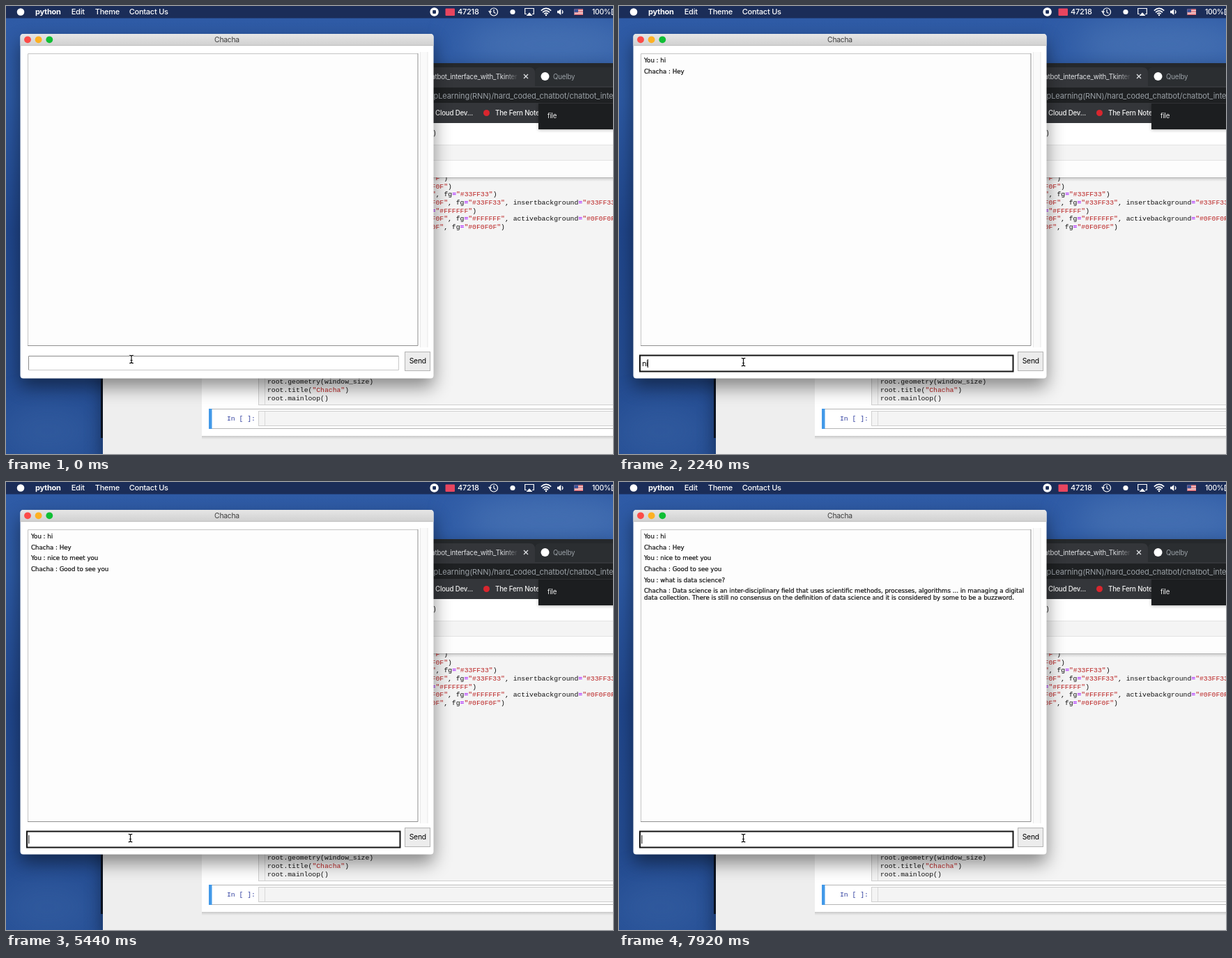
Animation of 871 by 643 pixels, one loop 8 s. Source, as an HTML page:

```html
<!DOCTYPE html>
<html lang="en">
<head>
<meta charset="utf-8">
<title>Chacha</title>
<style>
  html, body { margin: 0; width: 100%; height: 100%; overflow: hidden; background: #24509a; }
  svg { display: block; width: 100vw; height: 100vh; }
  text { white-space: pre; }
  .ui { font: 10.3px Inter, sans-serif; letter-spacing: -.22px; }
  .menu { font: 500 11px Inter, sans-serif; letter-spacing: -.24px; fill: #fff; }
  .tab { font: 9.7px Inter, sans-serif; letter-spacing: -.18px; }
  .url { font: 11px Inter, sans-serif; letter-spacing: -.08px; }
  .code { font: 9.76px "Liberation Mono", monospace; fill: #111; }
  .code .s { fill: #ba2121; }
  .code .o { fill: #a2f; font-weight: 700; }
  .chat { font: 8.64px "DejaVu Sans", sans-serif; fill: #111; stroke: #111; stroke-width: .22px; }
  .shadow { filter: drop-shadow(0 12px 13px rgba(0, 0, 0, .45)); }
  .tip { filter: drop-shadow(0 1px 2px rgba(0, 0, 0, .3)); }
  .cloud { filter: blur(24px); }
</style>
</head>
<body>
<svg viewBox="0 0 871 643" preserveAspectRatio="none">
  <defs>
    <linearGradient id="sky" x2="0" y2="1">
      <stop offset="0" stop-color="#2f5ba6"/>
      <stop offset=".2" stop-color="#2d5aa4"/>
      <stop offset=".5" stop-color="#20468b"/>
      <stop offset="1" stop-color="#264f95"/>
    </linearGradient>
    <linearGradient id="bar" x2="0" y2="1">
      <stop offset="0" stop-color="#e6e6e6"/>
      <stop offset="1" stop-color="#d0d0d0"/>
    </linearGradient>
    <linearGradient id="fade" x2="0" y2="1">
      <stop offset="0" stop-color="#000" stop-opacity=".16"/>
      <stop offset="1" stop-color="#000" stop-opacity="0"/>
    </linearGradient>
    <linearGradient id="tabInk" gradientUnits="userSpaceOnUse" x1="716" x2="735">
      <stop offset="0" stop-color="#dfe1e4"/>
      <stop offset="1" stop-color="#dfe1e4" stop-opacity="0"/>
    </linearGradient>
    <clipPath id="markClip"><path d="M600 140H764V168H600Z"/></clipPath>
    <clipPath id="cellClip"><path d="M600 246H871V540H600Z"/></clipPath>
  </defs>

  <!-- desktop -->
  <rect width="871" height="643" fill="url(#sky)"/>
  <g class="cloud" fill="#5c86c0">
    <ellipse cx="780" cy="55" rx="130" ry="36" opacity=".5"/>
    <ellipse cx="60" cy="610" rx="70" ry="40" opacity=".2"/>
  </g>

  <!-- browser -->
  <g class="shadow">
    <path d="M139 643V90Q139 82 147 82H871V643Z" fill="#25282b"/>
  </g>
  <path d="M136 535H139V620H136Z" fill="#0b1220"/>
  <path d="M139 115H600V88H751Q759 88 759 96V115H871V168H139Z" fill="#34363a"/>
  <path d="M759 115V96Q759 88 767 88H871V115Z" fill="#2b2e31"/>
  <rect x="300" y="117" width="580" height="22" fill="#1f2123"/>
  <text class="tab" x="610.2" y="104.5" fill="url(#tabInk)">atbot_interface_with_Tkinter</text>
  <path d="M743 98l6 6m0-6l-6 6" stroke="#dfe1e4" stroke-width="1.3"/>
  <circle cx="773.5" cy="101" r="6" fill="#fff"/>
  <text class="tab" x="785" y="104.5" fill="#9aa0a6">Quelby</text>
  <text class="url" x="613.5" y="132.5" fill="#9aa0a6">pLearning(RNN)/hard_coded_chatbot/chatbot_interface</text>
  <g class="tab" fill="#f1f1f1" style="font-weight:500" clip-path="url(#markClip)">
    <text x="616" y="157">Cloud Dev...</text>
    <circle cx="689.5" cy="153.5" r="4.5" fill="#d9262e"/>
    <text x="702" y="157">The Fern Notes</text>
  </g>

  <!-- notebook -->
  <rect x="139" y="168" width="732" height="475" fill="#eee"/>
  <rect x="281" y="168" width="590" height="449" fill="#fff"/>
  <rect x="281" y="617" width="590" height="5" fill="url(#fade)"/>
  <rect x="139" y="168" width="732" height="31" fill="#fff"/>
  <rect x="139" y="199" width="732" height="22" fill="#f4f4f4"/>
  <path d="M139 199.5H871M139 221.5H871" stroke="#e4e4e4"/>
  <rect x="139" y="222" width="732" height="24" fill="#fdfdfd"/>
  <text class="ui" x="613.5" y="186" fill="#222">)</text>
  <rect x="362.5" y="246.5" width="520" height="326" fill="#f4f4f4" stroke="#cfcfcf"/>
  <path d="M371.5 246V572" stroke="#d8d8d8"/>
  <rect x="281" y="246" width="590" height="6" fill="url(#fade)"/>
  <g class="code" clip-path="url(#cellClip)">
    <text x="616.5" y="250"><tspan class="s">F"</tspan>)</text>
    <text x="610.6" y="261.7"><tspan class="s">F0F"</tspan>)</text>
    <text x="610.9" y="273.3"><tspan class="s">"</tspan>, fg<tspan class="o">=</tspan><tspan class="s">"#33FF33"</tspan>)</text>
    <text x="610.6" y="285"><tspan class="s">F0F"</tspan>, fg<tspan class="o">=</tspan><tspan class="s">"#33FF33"</tspan>, insertbackground<tspan class="o">=</tspan><tspan class="s">"#33FF33"</tspan></text>
    <text x="610.6" y="296.7"><tspan class="o">=</tspan><tspan class="s">"#FFFFFF"</tspan>)</text>
    <text x="610.6" y="308.4"><tspan class="s">F0F"</tspan>, fg<tspan class="o">=</tspan><tspan class="s">"#FFFFFF"</tspan>, activebackground<tspan class="o">=</tspan><tspan class="s">"#0F0F0F"</tspan></text>
    <text x="610.6" y="320"><tspan class="s">0F"</tspan>, fg<tspan class="o">=</tspan><tspan class="s">"#0F0F0F"</tspan>)</text>
  </g>
  <g class="code">
    <text x="375" y="542">root.geometry(window_size)</text>
    <text x="375" y="553.8">root.title(<tspan class="s">"Chacha"</tspan>)</text>
    <text x="375" y="565.6">root.mainloop()</text>
  </g>
  <path d="M291 578.5H871M291 606.5H871" stroke="#b5b5b5"/>
  <rect x="291" y="578" width="4.5" height="29" fill="#4299e8"/>
  <rect x="362.5" y="581.5" width="520" height="21" fill="#f4f4f4" stroke="#cfcfcf"/>
  <path d="M371.5 582V602" stroke="#d8d8d8"/>
  <text class="code" x="317" y="595" style="fill:#303f9f">In [ ]:</text>

  <!-- tooltip -->
  <rect class="tip" x="764" y="140" width="120" height="37" fill="#1c1e20"/>
  <text class="tab" x="777" y="161" fill="#f1f1f1">file</text>

  <!-- menu bar -->
  <rect width="871" height="17.5" fill="#1b2d58"/>
  <circle cx="21" cy="8.5" r="5.3" fill="#fff"/>
  <g class="menu">
    <text x="42" y="12.2" style="font-weight:700">python</text>
    <text x="93.7" y="12.2">Edit</text>
    <text x="127.7" y="12.2">Theme</text>
    <text x="176.7" y="12.2">Contact Us</text>
    <text x="648" y="12.2">47218</text>
    <text x="841" y="12.2" style="font-size:10.3px">100%</text>
  </g>
  <circle cx="614.6" cy="8.5" r="6.2" fill="#fff"/>
  <rect x="612.2" y="6.1" width="4.8" height="4.8" rx=".8" fill="#1b2d58"/>
  <rect x="630.5" y="3.5" width="13.5" height="10.5" rx="1" fill="#e8455f"/>
  <g fill="none" stroke="#fff" stroke-width="1.2">
    <circle cx="700" cy="8.5" r="5.5"/>
    <path d="M700 5V9L702.5 10.5M692.5 7l2 2.5 2-2"/>
    <path d="M747 11.5H744.7V3.5H757.3V11.5H755"/>
    <path d="M767.8 6.6Q775 .2 782.2 6.6M770 9.1Q775 4.8 780 9.1M772.3 11.3Q775 9 777.7 11.3" stroke-width="1.6"/>
    <path d="M798 6Q800 8.5 798 11"/>
    <path d="M872 4.5H869.5V12.5H872"/>
  </g>
  <g fill="#fff">
    <circle cx="727" cy="8.5" r="3.6"/>
    <path d="M746.5 14L751 9.3L755.5 14Z"/>
    <circle cx="775" cy="13" r="1.2"/>
    <path d="M791 6.7H793L796.3 4V13L793 10.3H791Z"/>
    <rect x="815.5" y="4.5" width="12.5" height="8.5"/>
  </g>
  <path d="M815.5 5.2H828M815.5 7.6H828M815.5 10H828M815.5 12.4H828" stroke="#d0404a" stroke-width="1.2"/>
  <rect x="815.5" y="4.5" width="5.5" height="4.5" fill="#3c5499"/>

  <!-- chat window -->
  <g class="shadow">
    <path d="M20.5 530V44.5Q20.5 40 25 40H609Q613.5 40 613.5 44.5V530Q613.5 534.5 609 534.5H25Q20.5 534.5 20.5 530Z" fill="#fff"/>
  </g>
  <path d="M20.5 57V44.5Q20.5 40 25 40H609Q613.5 40 613.5 44.5V57Z" fill="url(#bar)"/>
  <path d="M20.5 56.7H613.5" stroke="#b9b9b9" stroke-width=".8"/>
  <circle cx="31" cy="48.3" r="4.9" fill="#fc4b48"/>
  <circle cx="46.6" cy="48.3" r="4.9" fill="#fdb124"/>
  <circle cx="62.3" cy="48.3" r="4.9" fill="#10bf35"/>
  <text class="ui" x="317" y="52.2" text-anchor="middle" fill="#3d3d3d">Chacha</text>
  <rect x="31.5" y="68.5" width="559.5" height="419" fill="#fdfdfd"/>
  <path d="M31.5 487.5V68.5H591" fill="none" stroke="#c4c4c4"/>
  <path d="M31 487.5H591V68" fill="none" stroke="#8f8f8f"/>
  <rect x="594" y="66" width="11" height="424" fill="#fafafa"/>
  <path d="M594.5 66V490M605 66V490" stroke="#e9e9e9"/>
  <rect x="572.5" y="496.5" width="36" height="27" fill="#ececec" stroke="#b4b4b4"/>
  <text class="ui" x="590.8" y="513.3" text-anchor="middle" fill="#000">Send</text>

  <g class="chat" id="log"></g>

  <g id="idle" fill="none">
    <path d="M32.5 523V502.5H564" stroke="#8c8c8c"/>
    <path d="M32 522.5H563.5V502" stroke="#c9c9c9"/>
  </g>
  <rect id="ring" x="30" y="501.5" width="535.5" height="23" fill="#fff" stroke="#141414" stroke-width="2"/>
  <text class="ui" id="entry" x="33.2" y="516.7"></text>
  <path id="caret" d="M0 507V519" stroke="#000"/>
  <g id="beam" fill="none">
    <path d="M-2.8-5.7Q0-5.7 0-4Q0-5.7 2.8-5.7M0-4.5V4.5M-2.8 5.7Q0 5.7 0 4Q0 5.7 2.8 5.7M-1.5 1.5H1.5" stroke="#fff" stroke-width="2.6"/>
    <path d="M-2.8-5.7Q0-5.7 0-4Q0-5.7 2.8-5.7M0-4.5V4.5M-2.8 5.7Q0 5.7 0 4Q0 5.7 2.8 5.7M-1.5 1.5H1.5" stroke="#111" stroke-width="1.2"/>
  </g>
</svg>
<script>
const LOOP = 8000, STEP = 80, FOCUS = 440;
const SVG = 'http://www.w3.org/2000/svg';
const $ = id => document.getElementById(id);
const [log, idle, ring, entry, caret, beam] =
  ['log', 'idle', 'ring', 'entry', 'caret', 'beam'].map($);

const turns = [
  { say: 'hi', from: 1040, pace: 160, send: 1760, reply: ['Hey'] },
  { say: 'nice to meet you', from: 2080, pace: 100, send: 3840, reply: ['Good to see you'] },
  { say: 'what is data science?', from: 5520, pace: 75, send: 7520, reply: [
    'Data science is an inter-disciplinary field that uses scientific methods, processes, algorithms ... in managing a digital',
    'data collection. There is still no consensus on the definition of data science and it is considered by some to be a buzzword.'
  ] }
];

function addLine(parent, y, str) {
  const el = document.createElementNS(SVG, 'text');
  el.setAttribute('x', 36);
  el.setAttribute('y', y);
  el.textContent = str;
  parent.append(el);
}

turns.forEach((turn, i) => {
  const y = 81 + i * 31.3;
  turn.group = document.createElementNS(SVG, 'g');
  log.append(turn.group);
  addLine(turn.group, y, 'You : ' + turn.say);
  turn.reply.forEach((str, k) =>
    addLine(turn.group, y + 15.7 + k * 9.3, (k ? '' : 'Chacha : ') + str));
});

const show = (el, on) => el.setAttribute('visibility', on ? 'visible' : 'hidden');

function draw(t) {
  let typed = '';
  for (const turn of turns) {
    show(turn.group, t >= turn.send);
    if (t >= turn.from && t < turn.send)
      typed = turn.say.slice(0, Math.floor((t - turn.from) / turn.pace) + 1);
  }
  if (entry.textContent !== typed) entry.textContent = typed;

  const focused = t >= FOCUS;
  show(idle, !focused);
  show(ring, focused);
  show(caret, focused && (t - FOCUS) % 900 < 600);
  const x = typed ? 33.2 + entry.getComputedTextLength() : 32.8;
  caret.setAttribute('transform', `translate(${x} 0)`);

  const p = Math.min(t / 400, 1), ease = p * p * (3 - 2 * p);
  beam.setAttribute('transform', `translate(${180 - 1.5 * ease} ${507 + 4 * ease})`);
}

const start = performance.now();
function tick() {
  const t = (performance.now() - start) % LOOP;
  draw(Math.floor(t / STEP) * STEP);
  requestAnimationFrame(tick);
}
tick();
</script>
</body>
</html>
```
